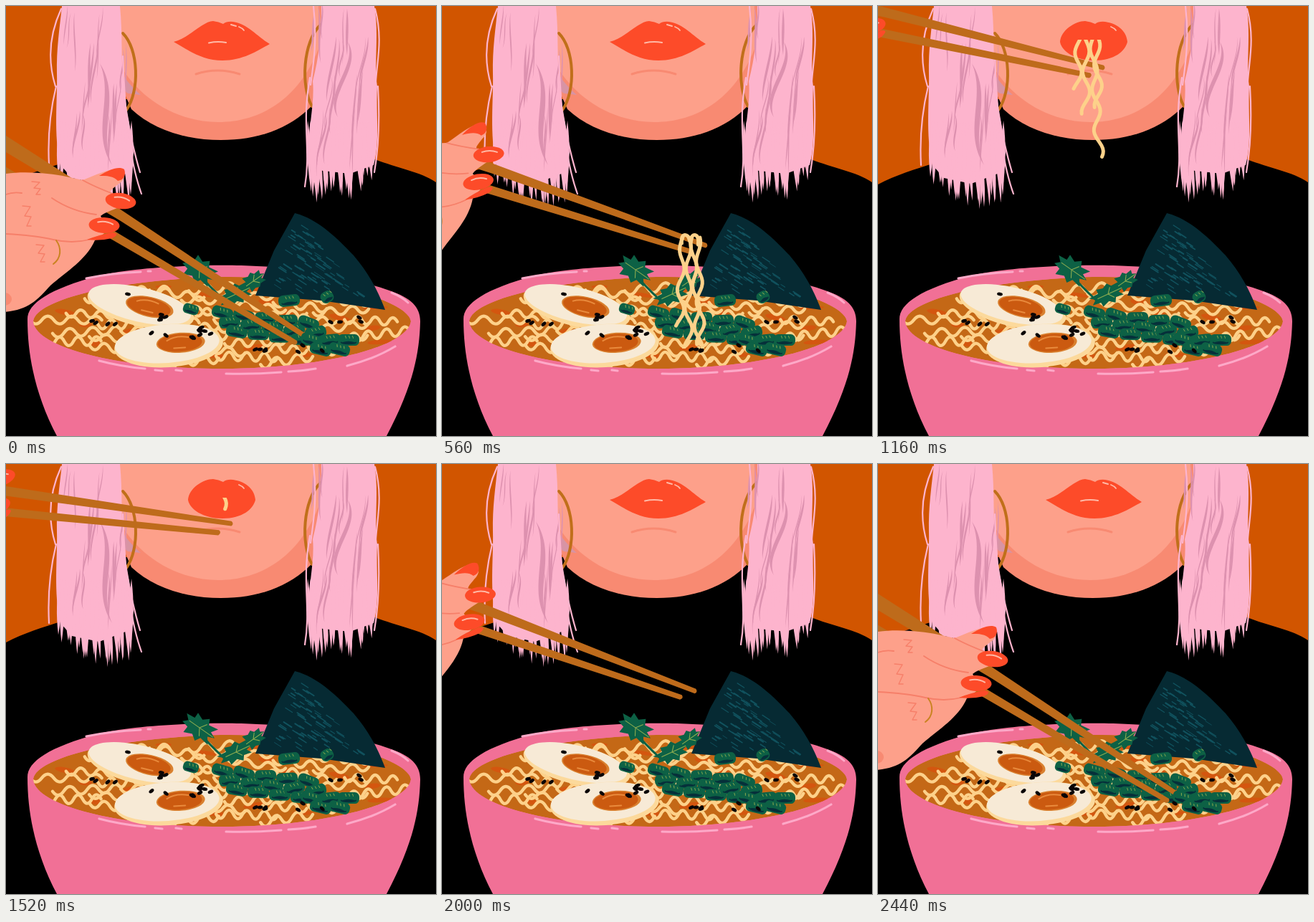
An HTML page for the animation above (2.52 s loop, 600 by 600 pixels).

```html
<!DOCTYPE html>
<html lang="en">
<head>
<meta charset="utf-8">
<title>Noodle bowl</title>
<style>
html, body { margin: 0; width: 100%; height: 100%; overflow: hidden; background: #d15500; }
svg { display: block; width: 100vw; height: 100vh; }
</style>
</head>
<body>
<svg id="stage" viewBox="0 0 600 600"></svg>
<script>
const C = {
  wall: '#d15500', skin: '#fda08a', shade: '#f88a72', crease: '#f67f69', red: '#fd4b29', shine: '#ffb9a6',
  hair: '#fdb4cd', lock: '#dd91af', gold: '#c06f1a', wood: '#be6b1b', bowl: '#f17096', rim: '#fda9c8',
  soup: '#c46816', oil: '#d4560f', noodle: '#fdd18a', egg: '#f7ead6', eggEdge: '#fcd99b',
  yolk: '#cb5a10', yolkRim: '#d9802f', leaf: '#0d6145', dark: '#06303a', vein: '#8cab50', nori: '#062a33', fleck: '#11525e'
};

let seed = 11;
const rnd = (a, b) => {
  seed = (seed * 16807) % 2147483647;
  return a + (b - a) * seed / 2147483647;
};
const mix = (a, b, k) => a + (b - a) * k;
const ramp = (a, b, t) => {
  const u = Math.min(1, Math.max(0, (t - a) / (b - a)));
  return u * u * (3 - 2 * u);
};
const times = (n, f) => Array.from({ length: n }, (_, i) => f(i)).join('');

const fill = (d, c) => `<path d="${d}" fill="${c}"/>`;
const line = (d, c, w) => `<path d="${d}" fill="none" stroke="${c}" stroke-width="${w}" stroke-linecap="round" stroke-linejoin="round"/>`;
const oval = (x, y, rx, ry, rot, c) =>
  `<ellipse rx="${rx}" ry="${ry}" fill="${c}" transform="translate(${x} ${y}) rotate(${rot})"/>`;
const group = (s, attr = '') => `<g ${attr}>${s}</g>`;
const placed = (x, y, rot, s) => group(s, `transform="translate(${x} ${y}) rotate(${rot})"`);

// Lock of hair: pointed at both ends, bent into an S by b
function lock(x, y, x2, y2, b, w, c) {
  const y3 = mix(y, y2, 1 / 3), y4 = mix(y, y2, 2 / 3);
  return fill(`M${x} ${y}C${x + b - w} ${y3} ${x2 - b - w} ${y4} ${x2} ${y2}C${x2 - b + w} ${y4} ${x + b + w} ${y3} ${x} ${y}Z`, c);
}

function backdrop() {
  return `<rect width="600" height="600" fill="${C.wall}"/>` +
    fill('M0 249C25 236 50 228 80 219L150 130H450L515 214C545 226 578 231 600 246V600H0Z', '#000') +
    fill('M150 0H440V115L427 139C395 172 350 187 300 187C250 187 205 172 175 144L160 110Z', C.shade) +
    fill('M150 0H436V60C408 130 355 162 296 162C238 162 184 128 158 80Z', C.skin) +
    fill('M155 84C165 100 175 113 188 124L170 122L158 112Z', '#d894a4') +
    line('M265 95Q295 85 326 95', C.shade, 3) +
    line('M163 38C185 60 187 118 168 145', C.gold, 4) +
    line('M439 26C414 50 411 112 427 140', C.gold, 4);
}

// Hair mass between x0 and x1 with ragged ends at tip(u) and wavy shadows
function tress(shape, x0, x1, tip) {
  const w = x1 - x0;
  return fill(shape, C.hair) +
    times(26, i => {
      const x = x0 + w * i / 25;
      return lock(x - 3, 160, x + rnd(-5, 6), tip(i / 25) + rnd(-10, 6), rnd(-2, 2), 4, C.hair);
    }) +
    times(20, i => {
      const x = x0 + w * (.08 + .84 * (i * .382 % 1)), y = i % 4 * 48 + rnd(-8, 12);
      return lock(x, y, x + rnd(-14, 4), y + rnd(50, 95), rnd(-6, 9), rnd(.8, 2.4), C.lock);
    });
}

function hair() {
  const left = tress('M78 0H159C163 40 160 75 164 105C166 140 174 165 178 205L172 232L130 248L92 240L76 222C66 180 72 130 71 95C70 60 75 30 78 0Z',
    78, 178, u => 232 + 46 * Math.sin(.2 + 2.3 * u));
  const right = tress('M440 0H514C521 40 513 80 518 112C516 150 522 190 513 222L480 234L425 228C416 190 432 140 428 105C437 70 440 40 440 0Z',
    424, 515, u => 262 + 8 * Math.sin(u * 11 + 1) - 22 * u ** 4);
  return left + lock(131, 80, 148, 222, 25, 5, C.lock) + right + lock(477, 50, 463, 155, 17, 4, C.lock) +
    line('M77 4C58 45 59 80 69 112M70 112Q57 165 60 222M163 70C166 150 172 215 189 262M166 140Q176 195 187 232' +
      'M429 0C434 45 430 75 425 110M424 100C412 165 426 200 417 252M515 4C526 45 518 75 516 105M519 112Q523 180 514 232', C.hair, 2.2);
}

const soupPath = 'M38 440C40 411 150 382 300 378C440 376 560 410 565 440C560 476 440 506 300 506C150 506 40 475 38 440Z';

// Sunflower spread over the soup
const spread = (n, rx, ry, f) => times(n, i => {
  const a = i * 2.4, r = Math.sqrt((i + .5) / n);
  return f(302 + rx * r * Math.cos(a), 443 + ry * r * Math.sin(a));
});

function noodle(x, y) {
  const n = Math.round(rnd(4, 7)), s = rnd(12, 17), k = rnd(-2.5, 2.5);
  return line(`M${x - n * s / 2} ${y - n * k / 2}q${s / 2} ${rnd(9, 13)} ${s} ${k}` + `t${s} ${k}`.repeat(n - 1), C.noodle, 4.4);
}

function soup() {
  return group(fill(soupPath, C.soup) +
    spread(30, 250, 56, (x, y) => oval(x, y, rnd(8, 18), rnd(2, 5), rnd(-15, 15), C.oil)) +
    spread(46, 240, 56, noodle), 'clip-path="url(#soup)"');
}

function egg(x, y, rx, ry, rot, dx) {
  return placed(x, y, rot, oval(0, 0, rx, ry, 0, C.eggEdge) + oval(-2, -3, rx - 3, ry - 3, 0, C.egg) +
    oval(dx, -3, 34, 14, 0, C.yolkRim) + oval(dx - 1, -3, 31, 12.5, 0, C.yolk) +
    line(`M${dx - 19} -7Q${dx - 6} -14 ${dx + 11} -10M${dx - 10} 4l16 0`, '#e98a3c', 2));
}

function nori() {
  return fill('M403 289L410 291C440 302 462 324 485 348C508 375 520 400 529 424L440 411L348 404L374 341Z', C.nori) +
    times(80, () => {
      const v = Math.sqrt(rnd(.01, .93)), u = rnd(.08, .9), l = rnd(4, 12);
      return line(`M${403 + v * (160 * u - 50)} ${292 + v * (106 + 8 * u)}l${l} ${l * .65}`, C.fleck, rnd(.8, 2.3));
    });
}

// Jagged parsley leaf
function leaf(x, y, rx, ry, rot) {
  const n = 18;
  const points = times(n, i => {
    const a = i * 2 * Math.PI / n, r = i % 2 ? rnd(.6, .75) : rnd(.9, 1.1);
    return `${rx * r * Math.cos(a)},${ry * r * Math.sin(a)} `;
  });
  return placed(x, y, rot, `<polygon points="${points}" fill="${C.leaf}"/>` +
    line(`M${-rx * .6} 0H${rx * .8}M0 0l6 ${-ry * .5}M0 0l6 ${ry * .5}`, C.vein, 1.1));
}

const herbs = () => line('M262 366Q280 388 306 412M350 378Q330 400 306 412', C.leaf, 3) +
  leaf(270, 368, 28, 19, 35) + leaf(345, 384, 20, 13, -35) + leaf(321, 402, 26, 15, -25);

// Slice of spring onion
function slice(x, y, w = 15, h = 8, rot = rnd(-12, 24)) {
  return placed(x, y, rot, `<rect x="${-w}" y="${-h}" width="${2 * w}" height="${2 * h}" rx="${h * .8}" fill="${C.leaf}"/>` +
    oval(0, h * .45, w * .75, h * .34, 0, C.dark) +
    line(`M${-w * .6} ${h * .3}Q0 ${-h * .1} ${w * .6} ${h * .3}`, C.leaf, 1.8) +
    line(`M${-w * .3} ${-h * .7}l1 3m4 -3l1 3m4 -3l1 3`, C.vein, .9));
}

const onions = () => slice(258, 423, 11, 7) + slice(395, 411) + slice(448, 406, 9, 8, -30) +
  times(14, i => slice(302 + i * 10, 440 + i * 1.2 + (i % 3 - 1) * 12));

const sesame = (x, y, n, rx, ry) => times(n, () => oval(x + rnd(-rx, rx), y + rnd(-ry, ry), 4, 2.4, rnd(-45, 45), '#0a0506'));

function bowl() {
  return fill('M30 437C30 415 60 395 130 376C190 362 300 360 350 363C430 366 500 385 535 397C565 407 578 420 578 440C577 485 568 530 531 600H71C42 545 30 490 30 437Z', C.bowl) +
    soup() + nori() + egg(188, 420, 76, 27, 13, 12) + egg(227, 474, 76, 30, -4, 17) + herbs() + onions() +
    line('M112 380Q145 373 188 371M198 370h4M538 400Q553 406 561 414', C.rim, 3) +
    line('M130 495Q160 503 194 506M208 508l10 1M237 508l8 1M307 513Q345 514 384 511M394 510Q415 509 432 506M476 502Q515 492 543 475', C.rim, 3.2) +
    sesame(276, 456, 8, 17, 9) + sesame(219, 434, 4, 10, 4) + sesame(360, 479, 4, 14, 4) + sesame(135, 448, 4, 20, 15) +
    sesame(210, 459, 2, 14, 4) + sesame(470, 445, 4, 50, 18) + oval(170, 402, 4, 2.4, 10, '#0a0506');
}

function hand() {
  const sticks = fill('M-130 98V126L160 300L424 469Q429 468 427 463L160 284L0 181Z', C.wood) +
    fill('M-100 166L-108 182L148 326L402 473Q408 472 406 467L148 312Z', C.wood);
  const skin = 'M-160 232L0 234C30 230 62 234 84 238L107 243C125 236 143 227 158 227C168 231 167 243 156 249C148 256 140 260 150 263' +
    'L160 280C148 285 138 288 132 293L143 311C138 318 130 322 124 327C112 354 85 370 62 390C42 412 30 425 -5 427L-160 450Z';
  const nail = (x, y, rot) => placed(x, y, rot, oval(0, 0, 21.5, 11, 0, C.red) + line('M-9 -4Q2 -7 12 -2', C.shine, 2));
  const knuckle = (x, y, h) => line(`M${x} ${y}l11 1l-8 ${h}l9 1l-6 ${h}l6 0`, C.crease, 1.4);
  return sticks + fill(skin, C.skin) + oval(-2, 409, 10, 9, 0, C.shade) +
    line('M107 243Q121 251 149 262M64 268Q92 287 126 291M0 318Q40 320 66 326T116 326M0 263Q10 259 22 261', C.crease, 1.8) +
    knuckle(36, 245, 8) + knuckle(23, 279, 13) + knuckle(42, 333, 11) +
    fill('M130 237C144 228 158 223 165 228C168 236 164 243 156 244C150 237 141 237 130 237Z', C.red) +
    fill('M113 326Q130 319 149 316Q160 318 148 324Q132 328 113 326Z', C.red) +
    nail(160, 272, 8) + nail(137, 306, 3) +
    line('M70 327C78 338 77 352 66 360', '#c98320', 2);
}

// Hanging noodle from x to x2, waving more towards its end
function strand(x, x2, end, phase) {
  const top = 148, n = Math.round((end - top) / 4);
  const points = times(n + 1, i => {
    const u = i / n;
    return `${i ? 'L' : 'M'}${mix(x, x2, u) + (3 + 3 * u) * Math.sin(u * (end - top) / 9 + phase)} ${mix(top, end, u)}`;
  });
  return line(points, C.noodle, 5);
}
const strands = () => strand(285, 281, 271, 3) + strand(294, 293, 306, 0) + strand(299, 312, 366, 3.4) + strand(307, 311, 297, 1) +
  line('M284 156C282 140 294 142 295 152M296 152C298 141 309 141 307 158', C.noodle, 5);

const stage = document.getElementById('stage');
stage.innerHTML =
  `<defs><clipPath id="soup"><path d="${soupPath}"/></clipPath>` +
  '<clipPath id="above"><rect x="-10" y="-10" width="620" height="483"/></clipPath>' +
  '<clipPath id="mouth"><rect y="47" width="600" height="431"/></clipPath></defs>' +
  backdrop() + `<path id="lips" fill="${C.red}"/>` +
  group(line('M283 51.5Q295 49 307 51M314 26l7 2', C.shine, 2), 'id="glint"') +
  line('M325 29Q330 31 332 34', C.shine, 1.8) + hair() + bowl() +
  group(group(hand(), 'id="hand"'), 'clip-path="url(#above)"') +
  group(group(strands(), 'id="noodles"'), 'clip-path="url(#mouth)"') +
  times(5, i => slice(426 + i * 13, 466 + i % 2 * 13)) + sesame(425, 476, 3, 22, 8);

// Smooth curve through keys [time, values...], flat at turning points
function track(keys, t) {
  const last = keys.length - 1;
  if (t >= keys[last][0]) return keys[last].slice(1);
  let i = 0;
  while (keys[i + 1][0] <= t) i++;
  const slope = (k, c) => {
    if (k === 0 || k === last) return 0;
    const [p, q, r] = [keys[k - 1], keys[k], keys[k + 1]];
    return (q[c] - p[c]) * (r[c] - q[c]) <= 0 ? 0 : (r[c] - p[c]) / (r[0] - p[0]);
  };
  const a = keys[i], b = keys[i + 1], d = b[0] - a[0], u = (t - a[0]) / d, v = 1 - u;
  return a.slice(1).map((y, j) => {
    const c = j + 1;
    return y * v * v * (1 + 2 * u) + b[c] * u * u * (3 - 2 * u) + d * u * v * (v * slope(i, c) - u * slope(i + 1, c));
  });
}

const LOOP = 2520, STEP = 40, TIP = [426, 466], BITE = 1000;
// time, tip x, tip y, turn
const handKeys = [[0, ...TIP, 0], [280, 438, 478, 0], [800, 314, 148, -24], [BITE, 314, 62, -22], [1160, 315, 86, -19],
  [1520, 315, 83, -25], [2000, 354, 317, -12], [2440, ...TIP, 0]];

// Noodles hang from the tip until the bite, then are slurped at a steady speed
function noodleShift(t, [x, y, turn]) {
  if (t >= BITE) return [(BITE - t) / 52, -90 - .41 * (t - BITE)];
  const k = 1 + turn / 24;
  return [x - 314 - 10 * k, y - 148 - 25 * k + 45 * (1 - ramp(0, 240, t))];
}

function lips(k) {
  const m = (a, b) => mix(a, b, k), l = m(234, 254);
  return `M${l} 50C255 ${m(45, 34)} 275 21 289 21Q297 22 303 25Q308 21 317 22C337 25 ${m(350, 347)} ${m(42, 37)} ${m(368, 348)} ${m(53, 50)}` +
    `C${m(350, 345)} 63 330 76 302 76C275 76 256 63 ${l} 50Z`;
}

const [handEl, noodleEl, lipsEl, glintEl] = ['hand', 'noodles', 'lips', 'glint'].map(id => document.getElementById(id));

function draw(t) {
  const pose = track(handKeys, t);
  handEl.setAttribute('transform', `translate(${pose[0]} ${pose[1]}) rotate(${pose[2]}) translate(${-TIP[0]} ${-TIP[1]})`);
  noodleEl.setAttribute('transform', `translate(${noodleShift(t, pose)})`);
  const k = ramp(880, BITE, t) - ramp(1580, 1700, t);
  lipsEl.setAttribute('d', lips(k));
  glintEl.setAttribute('opacity', 1 - k);
}

let start;
function tick(now) {
  start ??= now;
  draw(Math.floor((now - start) / STEP) * STEP % LOOP);
  requestAnimationFrame(tick);
}
draw(0);
requestAnimationFrame(tick);
</script>
</body>
</html>
```
